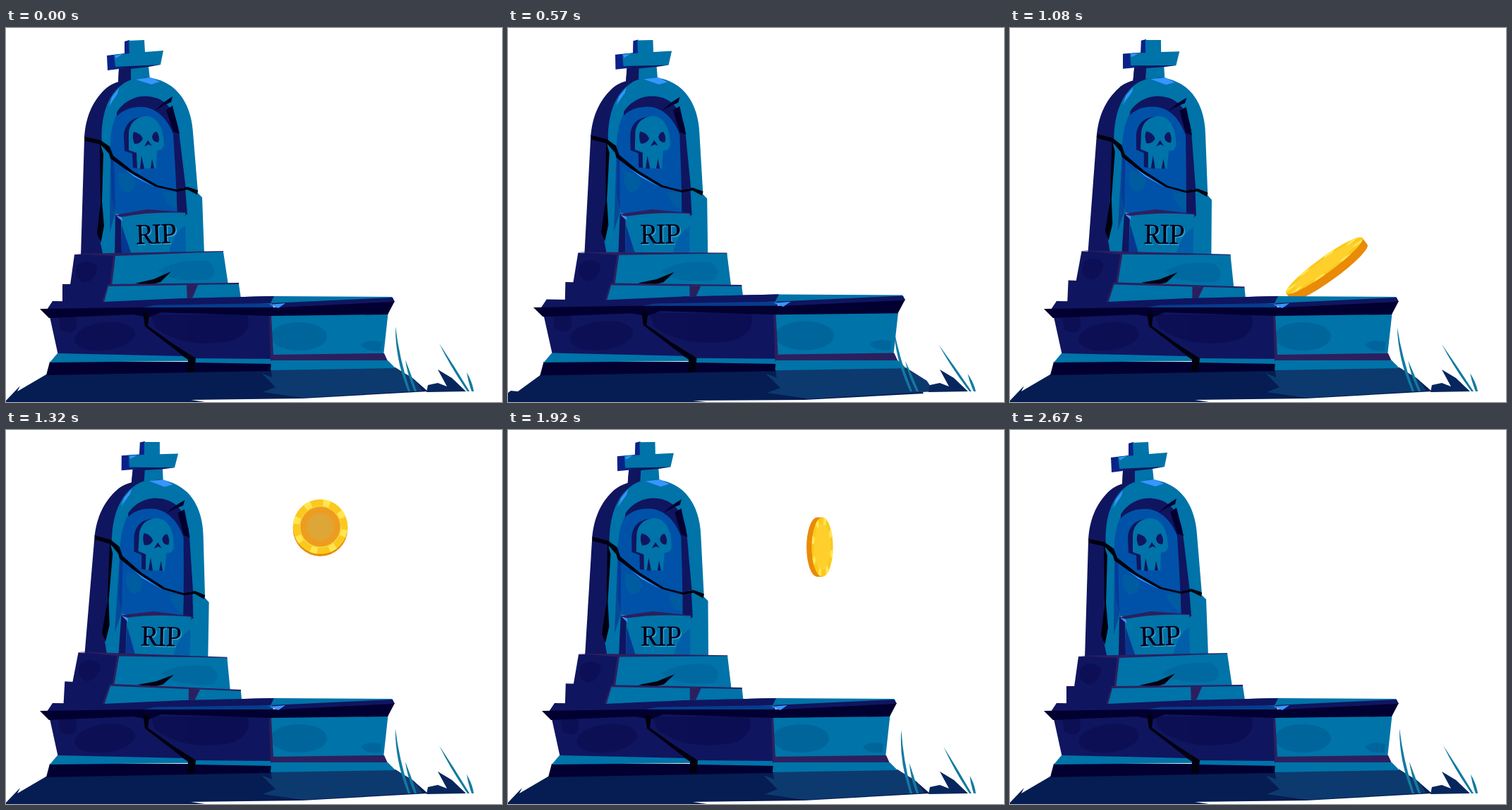
Write an HTML page that moves like this. It is 703x530 px and loops after 2.7 s.

```html
<!DOCTYPE html>
<html lang="en">
<head>
<meta charset="utf-8">
<title>Gravestone and coin</title>
<style>
html, body { margin: 0; width: 100%; height: 100%; overflow: hidden; background: #fff; }
svg { display: block; width: 703px; height: 530px; }
.navy { fill: #10155f; }
.deep { fill: #0b0d4f; }
.ink { fill: #020030; }
.black { fill: #01000f; }
.teal { fill: #0073a8; }
.blue { fill: #0052a8; }
.plum { fill: #2b205f; }
.side { fill: #0a2288; }
.shine { fill: #3795ff; }
.shade { fill: #00659b; }
.grass { fill: #127aa0; }
text { font: 38px "Noto Serif", serif; letter-spacing: -1.6px; text-anchor: middle; }
</style>
</head>
<body>
<svg viewBox="0 0 703 530">
  <defs><clipPath id="above"><path d="M0 0H703V386H0Z"/></clipPath></defs>

  <g id="tomb">
    <!-- cross -->
    <path class="side" d="M168 19 175 17 176 36 176 78 159 78 160 58 144 60 143 39 168 36Z"/>
    <path class="teal" d="M174 18 196 17 197 34 223 32 219 52 202 54 204 73 177 75 176 57 155 55 153 38 175 36Z"/>
    <path class="navy" d="M160 58 177 56 177 76 159 78ZM155 55 219 52 202 55 176 58Z"/>
    <path class="shine" d="M154 39 165 37 156 43Z"/>

    <!-- upper block -->
    <path class="navy" d="M111 158C112 128 122 105 139 88C146 81 157 75 172 74L200 70 170 110 148 185 134 170Z"/>
    <path class="teal" d="M136 168C133 123 145 94 166 79C182 68 207 67 227 78C250 90 263 116 265 148L272 233 257 230 243 232 148 184Z"/>
    <path class="shine" d="M150 98 160 85 158 93 146 111ZM184 73 205 70 218 76 206 80Z"/>
    <path class="blue" d="M148 178C147 141 154 116 176 102C198 89 227 100 240 127C247 144 248 180 255 229L256 264H153L146 215Z"/>
    <path class="navy" d="M157 120C164 107 181 95 202 97C231 99 244 126 246 155L255 229 256 264 243 263 240 200 237 150C226 122 206 110 187 112C174 113 165 117 157 125Z"/>
    <path class="ink" d="M211 117 224 105 236 97 234 105 223 110ZM227 116 236 110 246 150 237 147Z"/>
    <path class="shade" opacity=".55" d="M160 205Q175 203 183 216Q184 234 168 233Q157 225 160 205ZM222 232H242V257Q225 250 222 232Z"/>

    <!-- skull -->
    <path class="navy" d="M167 153C168 133 182 125 199 126L195 200 180 198 179 178 168 174Z"/>
    <path class="teal" d="M174 151C174 133 187 125 200 125C215 126 224 144 224 166L221 172 214 174 213 199 186 199 185 177 174 173Z"/>
    <path class="navy" d="M181 147Q191 149 194 157Q190 165 182 164Q178 154 181 147ZM207 154Q209 146 214 147Q219 156 216 162Q208 162 207 154ZM196 168 201 159 207 167 202 165ZM192 181 196 199 190 199ZM207 185 210 199 205 199Z"/>

    <!-- lower block -->
    <path class="navy" d="M111 157 135 164 140 324 106 324Z"/>
    <path class="teal" d="M135 166 149 181 150 240 157 265 156 324H138L133 300ZM250 226H258L271 233 278 240 281 321H250Z"/>
    <path class="navy" d="M242 229 254 228 257 264H243Z"/>
    <path class="side" d="M148 185 153 189 155 262 147 290Z" opacity=".5"/>
    <path class="black" d="M133 162 138 178 136 245 139 280 135 305 129 291 134 248Z"/>
    <path class="teal" d="M139 282 149 290 145 318 134 306Z"/>
    <path class="black" d="M111 154 134 159 147 168 152 181 180 203 215 223 242 229 257 225 272 230 271 236 257 229 242 232 212 225 176 205 148 185 146 178 134 165 112 160Z"/>
    <path class="shine" d="M168 200 184 210 212 226 182 211Z"/>

    <!-- plaque -->
    <path class="plum" d="M155 265 200 257 255 261 255 266 164 270Z"/>
    <path class="navy" d="M155 265 166 270 169 323H154Z"/>
    <path class="teal" d="M163 268Q205 260 254 262L255 321 164 323Z"/>
    <path class="side" opacity=".75" d="M164 280 178 321 164 323Z"/>
    <path class="blue" opacity=".6" d="M254 280Q237 290 231 321H255Z"/>
    <path class="shine" d="M156 266 164 268 165 274Z"/>
    <g transform="rotate(-2 211 292)">
      <text x="213.5" y="307" fill="#3ba0cf">RIP</text>
      <text x="212" y="305.5" fill="#020018">RIP</text>
    </g>

    <!-- steps -->
    <path class="navy" d="M97 321H156L150 366 91 364Z"/>
    <path class="plum" d="M97 320 308 316 308 320 156 325 151 365 147 365 152 323Z"/>
    <path class="teal" d="M155 323 308 317 315 364 150 366Z"/>
    <path class="shade" opacity=".6" d="M215 345Q240 327 285 330Q304 343 289 356Q240 362 215 345Z"/>
    <path class="deep" opacity=".6" d="M100 337Q115 325 129 337Q129 356 112 361Q95 357 100 337Z"/>
    <path class="black" d="M183 362 209 356 234 345 219 360 205 364Z"/>
    <path class="navy" d="M80 363H148L137 400H80Z"/>
    <path class="plum" d="M144 363 330 361 330 365 145 367 139 392 135 392Z"/>
    <path class="teal" d="M145 366 330 363 334 390 251 394 137 396Z"/>
    <path class="plum" d="M256 364H272L261 390H257Z"/>
  </g>

  <g clip-path="url(#above)"><g id="coin">
    <path id="edge" fill="#e98a08"/>
    <g id="face">
      <circle r="1" fill="#fbc91d"/>
      <g id="facets" fill="#ffe650"></g>
      <circle r=".77" fill="#f9d23a"/>
      <circle id="well" r=".73"/>
      <circle id="badge" r=".5" fill="#dda637"/>
    </g>
  </g></g>

  <path id="ground" fill="#051d52"/>
  <g id="base">
    <path fill="#0c3a6f" d="M362 489 377 495 375 482 552 481 580 499 590 514 420 524 364 516 382 509Z"/>
    <path class="navy" d="M66 387 139 388 251 383 380 380 378 400 56 402Z"/>
    <path class="blue" d="M220 391 376 388 378 396 190 397Z" opacity=".65"/>
    <path class="teal" d="M251 383 380 380 548 381 540 388 376 391Z"/>
    <path class="navy" d="M251 383 380 380 375 390 190 393Z"/>
    <path class="navy" d="M60 400H378V472L268 470 74 464Z"/>
    <path class="teal" d="M375 402 542 400 535 464 376 466Z"/>
    <g class="deep" opacity=".75">
      <ellipse cx="140" cy="437" rx="43" ry="20" transform="rotate(-7 140 437)"/>
      <path d="M205 406H342Q350 432 320 443Q255 456 212 425ZM74 406H97Q106 428 90 432L77 428Z"/>
    </g>
    <ellipse class="shade" cx="415" cy="437" rx="40" ry="20"/>
    <path class="shade" d="M503 449Q512 440 532 445L531 457Q511 459 503 449Z"/>
    <path class="ink" d="M48 398 180 396 375 396 551 387 541 406 375 408 220 403 202 410 180 406 61 411Z"/>
    <path class="navy" d="M376 390 548 382 551 388 388 396Z"/>
    <path class="shine" d="M373 392 396 390 386 397Z"/>
    <path class="ink" d="M62 473H377L376 486 57 492Z"/>
    <path class="teal" d="M73 461 250 465 262 472 62 474ZM262 468 377 469V476L262 474Z"/>
    <path class="plum" d="M376 463 536 461 541 472 376 472Z"/>
    <path class="teal" d="M376 471H541L552 482 375 485Z"/>
    <path class="plum" d="M373 408H376L379 464 375 473Z"/>
    <path class="black" d="M194 402 203 406 201 422 236 447 269 468 267 487 257 488 258 470 236 453 197 423Z"/>
  </g>

  <path fill="#06265d" d="M596 516 598 506 612 503 625 508 612 484 632 496 652 515Z"/>
  <g id="grass" class="grass"></g>
</svg>
<script>
const $ = id => document.getElementById(id);
const NS = 'http://www.w3.org/2000/svg';
const LOOP = 2700, CYCLE = 2670;

function add(parent, attrs) {
  const el = document.createElementNS(NS, 'path');
  for (const k in attrs) el.setAttribute(k, attrs[k]);
  return parent.appendChild(el);
}

// tip x, tip y, root x, root y, bend, sway
const blades = [
  [552, 423, 571, 515, -9, 5.5],
  [566, 470, 580, 515, -3, 3],
  [614, 447, 655, 515, -3, 3.5],
  [653, 488, 661, 515, -1, 1.5]
].map(b => ({ b, el: add($('grass'), {}) }));

for (let i = 0; i < 8; i++) {
  add($('facets'), { d: 'M0 0L.99 -.14Q1.01 0 .99 .14Z', transform: `rotate(${i * 45 + 15})` });
}

const clamp = x => Math.max(0, Math.min(1, x));
const ease = (t, a, b) => (1 - Math.cos(Math.PI * clamp((t - a) / (b - a)))) / 2;

// resting ground outline and its shift when the base swells
const soil = [
  [0, 528, 0, -11], [20, 507, -16, 7], [16, 515, -2, 0], [57, 491, -10, 0],
  [375, 483, 0, 0], [550, 481, 9, -4], [575, 495, 0, -1], [598, 515, -9, 3],
  [420, 525, 0, 2], [262, 527, 0, 1], [282, 530, 0, 0], [0, 530, 0, 0]
];

function drawCoin(t) {
  let y, r, spin = 0, turn = 0;
  if (t < 700) {
    y = 411 + 70 * ((t - 300) / 190) ** 2;
    r = 80;
  } else {
    const dt = t - 1620;
    y = 48 + dt * dt * (dt < 0 ? 0.00099 : 0.00131);
    const h = y - 50;
    r = 30 + h * 0.088 + h * h * 0.00014;
    spin = (t - 1320) * 0.415;
    turn = (t - 1320) * 0.15;
  }
  const shown = y - r < 386;
  $('coin').style.display = shown ? '' : 'none';
  if (!shown) return;
  const a = spin * Math.PI / 180, c = Math.cos(a);
  const flat = Math.max(0.05, Math.abs(c));
  const depth = 0.08 + 0.1 * Math.abs(Math.sin(a));
  $('coin').setAttribute('transform', `translate(445.5 ${y}) rotate(${turn}) scale(${r})`);
  $('edge').setAttribute('d', `M-1 0V${depth}A1 ${flat} 0 0 0 1 ${depth}V0Z`);
  $('face').setAttribute('transform', `scale(1 ${flat})`);
  $('badge').style.display = c > 0 ? '' : 'none';
  $('well').setAttribute('fill', c > 0 ? '#ee9c20' : '#ffcf2c');
}

function draw(t) {
  const lean = 1 - Math.abs(2 * t / CYCLE - 1);
  $('tomb').setAttribute('transform', `rotate(${3.15 * lean} 205 420)`);

  const swell = ease(t, 0, 270) - ease(t, 870, 1060) + ease(t, 2110, 2315) - ease(t, 2330, 2600);
  const sx = 1 + 0.048 * swell, sy = 1 + 0.027 * swell;
  $('base').setAttribute('transform', `translate(299.5 475) scale(${sx} ${sy}) translate(-299.5 -475)`);
  $('ground').setAttribute('d', 'M' + soil.map(([x, y, dx, dy]) =>
    `${x + dx * swell} ${y + dy * swell}`).join('L') + 'Z');

  const wind = Math.sin(2 * Math.PI * t / CYCLE);
  for (const { b: [x, y, rx, ry, bend, sway], el } of blades) {
    const tx = x - sway * wind, ty = y + Math.abs(wind) * 2;
    const mx = (tx + rx) / 2 + bend, my = (ty + ry) / 2;
    el.setAttribute('d', `M${tx} ${ty}Q${mx - 1} ${my} ${rx - 1} ${ry}L${rx + 2} ${ry}Q${mx + 5} ${my} ${tx} ${ty}Z`);
  }
  drawCoin(t);
}

const start = performance.now();
function tick() {
  const t = (performance.now() - start) % LOOP;
  draw(Math.floor(t / 30) * 30);
  requestAnimationFrame(tick);
}
draw(0);
requestAnimationFrame(tick);
</script>
</body>
</html>
```
